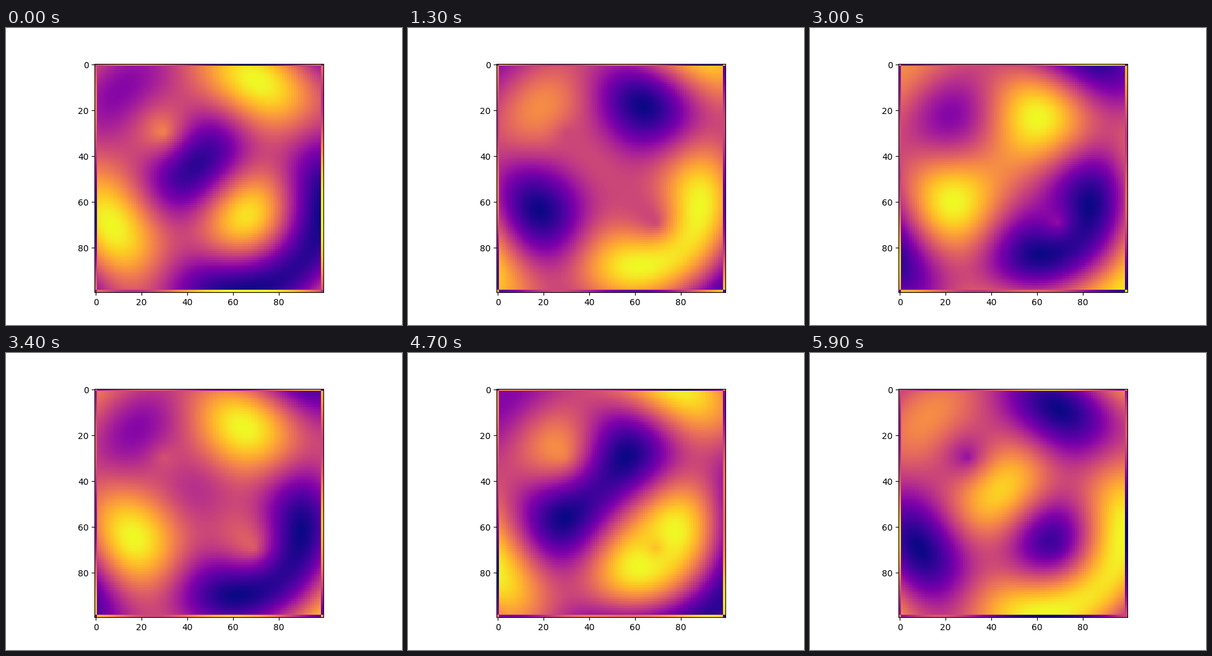
A matplotlib script for the animation above (6000 ms loop, 640 by 480 pixels).

```python
import numpy as np
import matplotlib.pyplot as plt
from matplotlib.animation import FuncAnimation

FRAMES = 60
INTERVAL = 100          # ms
STEP = np.pi / 20       # phase advance per frame

axis = np.linspace(0, 10, 100)
X, Y = np.meshgrid(axis, axis)
R1 = np.hypot(X - 3, Y - 3)
R2 = np.hypot(X - 7, Y - 7)


def wave_field(phase):
    """Two circular waves a quarter period apart, inverted at the walls."""
    z = np.sin(phase - R1) + np.sin(phase - R2 + np.pi / 2)
    z[0, :], z[-1, :] = -z[1, :], -z[-2, :]
    z[:, 0], z[:, -1] = -z[:, 1], -z[:, -2]
    return z


fig, ax = plt.subplots(figsize=(6.4, 4.8), dpi=100)
image = ax.imshow(wave_field(0), cmap="plasma", vmin=-2, vmax=2)


def update(frame):
    image.set_data(wave_field(frame * STEP))
    return [image]


anim = FuncAnimation(fig, update, frames=FRAMES, interval=INTERVAL, repeat=True)
plt.show()
```
